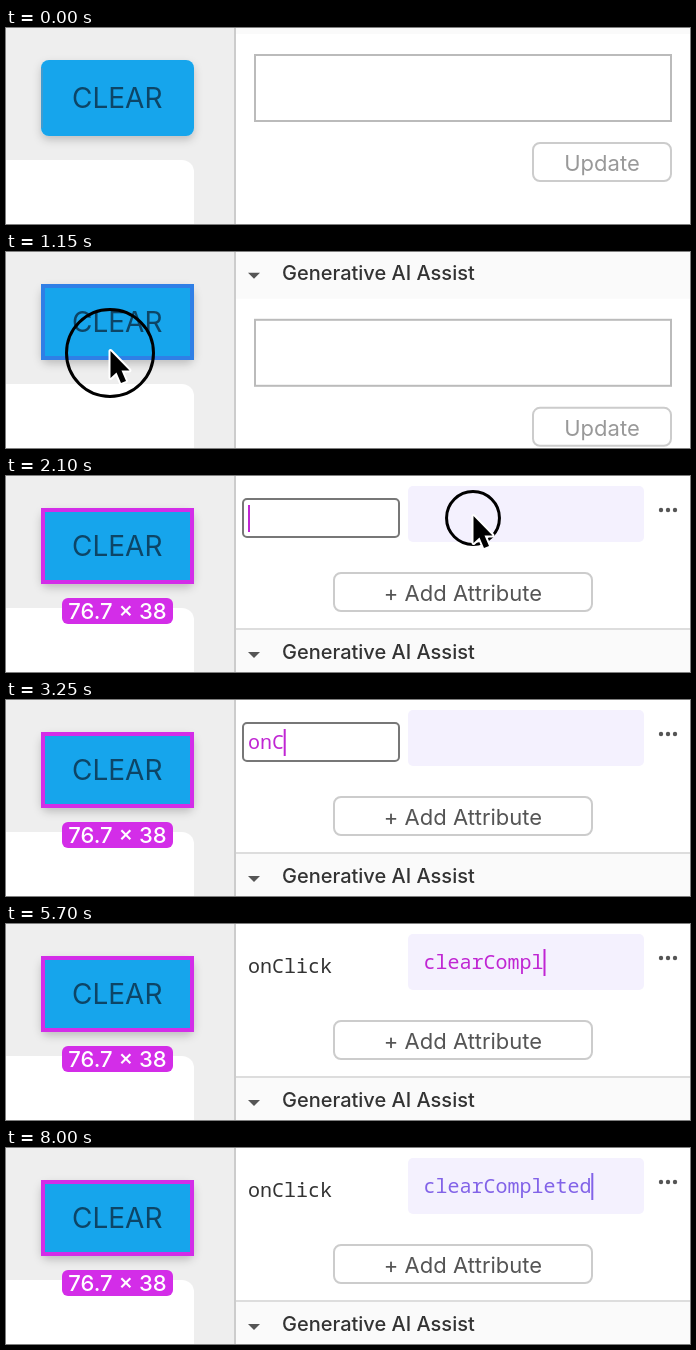
Write an HTML page that moves like this. It is 684 by 196 pixels and loops after 8250 ms.

```html
<!DOCTYPE html>
<html lang="en">
<head>
<meta charset="utf-8">
<title>Attribute editor</title>
<style>
  html, body { margin: 0; width: 100%; height: 100%; overflow: hidden; background: #fff; }
  svg { display: block; width: 684px; height: 196px; }
  text { font: 22px Inter, sans-serif; white-space: pre; }
  .mono { font: 20px "Noto Sans Mono", monospace; }
  .line { fill: #fff; stroke-width: 2; }
</style>
</head>
<body>
<svg viewBox="0 0 684 196">
  <defs>
    <filter id="soft" x="-20%" y="-30%" width="140%" height="180%">
      <feDropShadow dx="0" dy="4" stdDeviation="4" flood-opacity=".2"/>
    </filter>
  </defs>

  <rect width="228" height="196" fill="#eee"/>
  <rect x="-20" y="132" width="208" height="90" rx="12" fill="#fff"/>
  <rect x="35" y="32" width="153" height="76" rx="8" fill="#18a5ec" filter="url(#soft)"/>
  <path d="M36 40V100" stroke="#3d9cd2" stroke-width="2"/>
  <text x="66" y="80" style="font-size:28px" fill="#0d4566">CLEAR</text>
  <rect id="outline" x="37" y="34" width="149" height="72" fill="none" stroke-width="4"/>
  <g id="size">
    <rect x="56" y="122" width="111" height="26" rx="6" fill="#d32de8"/>
    <text x="111.5" y="143" text-anchor="middle" style="font-weight:500" fill="#fff">76.7 × 38</text>
  </g>

  <g id="panel">
    <g id="add">
      <rect class="line" x="328" y="-99" width="258" height="38" rx="7" stroke="#ccc"/>
      <text x="457" y="-71" text-anchor="middle" fill="#555">+ Add Attribute</text>
    </g>
    <rect x="230" y="-43" width="454" height="49" fill="#fafafa"/>
    <rect x="230" y="-44" width="454" height="2" fill="#ddd"/>
    <path d="M242-20h12l-6 6z" fill="#555"/>
    <text x="276" y="-13" style="font-size:20px;font-weight:500" fill="#333">Generative AI Assist</text>
    <rect class="line" x="249" y="27" width="416" height="66" stroke="#bbb"/>
    <rect class="line" x="527" y="115" width="138" height="38" rx="7" stroke="#ccc"/>
    <text x="596" y="143" text-anchor="middle" fill="#999">Update</text>
  </g>

  <g id="row">
    <rect id="field" class="line" x="237" y="23" width="156" height="38" rx="4" stroke="#777"/>
    <text id="name" class="mono" x="242" y="49"></text>
    <rect x="402" y="10" width="236" height="56" rx="5" fill="#f4f1fe"/>
    <text id="value" class="mono" x="417.5" y="45"></text>
    <g fill="#555"><circle cx="655" cy="34" r="2.2"/><circle cx="662" cy="34" r="2.2"/><circle cx="669" cy="34" r="2.2"/></g>
    <rect id="caret" width="2" height="27"/>
  </g>

  <rect x="228" width="2" height="196" fill="#ccc"/>
  <g id="mouse">
    <circle id="ring" cx="1" cy="4" fill="none" stroke="#000" stroke-width="3"/>
    <path d="M1.500 2V29L7.500 23.500L12 34L17 32L12.500 21.500H20.500Z"
      stroke="#fff" stroke-width="4" paint-order="stroke" stroke-linejoin="round"/>
  </g>
</svg>
<script>
const $ = id => document.getElementById(id);
const set = (id, attrs) => { for (const k in attrs) $(id).setAttribute(k, attrs[k]); };
const show = (id, on) => set(id, { visibility: on ? 'visible' : 'hidden' });
const clamp = x => Math.max(0, Math.min(1, x));
const span = (t, a, b) => clamp((t - a) / (b - a));
const ease = p => p < .5 ? 2 * p * p : 1 - 2 * (1 - p) ** 2;
const mix = (a, b, p) => a + (b - a) * p;

// Times at which each character appears
const nameKeys = [2900, 3000, 3250, 3350, 3400, 3450, 3500];
const valueKeys = [4350, 4400, 4500, 4550, 4650, 5350, 5550, 5600, 5650, 5700, 5800, 5850, 5900, 6000];
// Times at which the caret becomes visible again and starts a new blink
const caretStarts = [2100, 3750, 4300, 7000];
const typed = (text, keys, t) => text.slice(0, keys.filter(k => k <= t).length);
const pink = '#c026d3', violet = '#8263e8';

function draw(t) {
  const selected = t >= 1200, added = t >= 2100, naming = t < 3750;

  // Pointer
  const enter = ease(span(t, 500, 1050)), move = ease(span(t, 1550, 2050));
  const x = mix(mix(-24, 103, enter), 466, move);
  const y = mix(mix(190, 97, enter), 38, move);
  show('mouse', t >= 550 && t < 2900);
  set('mouse', { transform: `translate(${x} ${y})` });
  const press = t < 1600
    ? 43.5 * span(t, 1000, 1130) * (1 - span(t, 1200, 1350))
    : 27 * span(t, 2000, 2080) * (1 - span(t, 2100, 2150));
  set('ring', { r: press, opacity: press > 1 ? 1 : 0 });

  // Canvas selection
  show('outline', selected || (t >= 550 && y < 108 && x > 35));
  set('outline', { stroke: selected ? '#d32de8' : '#2f7fe6' });
  show('size', selected);

  // Side panel
  const shift = added ? 196 : 120 * span(t, 1100, 1250);
  set('panel', { transform: `translate(0 ${shift})` });

  // Attribute row
  $('row').style.display = added ? '' : 'none';
  show('field', naming);
  const name = typed('onClick', nameKeys, t), value = typed('clearCompleted', valueKeys, t);
  const ink = t < 7000 ? pink : violet;
  $('name').textContent = name;
  set('name', { fill: naming ? pink : '#333' });
  $('value').textContent = value;
  set('value', { fill: ink });

  const last = Math.max(...[...caretStarts, ...nameKeys, ...valueKeys].filter(k => k <= t));
  const blinkOn = Math.floor((t - last) / 250) % 2 === 0;
  show('caret', added && (blinkOn || (t >= 3500 && naming)) && !(t >= 4000 && t < 4300));
  set('caret', naming
    ? { x: 242 + name.length * 11.9, y: 29, fill: pink }
    : { x: 418 + value.length * 11.95, y: 25, fill: ink });
}

const start = performance.now();
function frame(now) {
  draw(Math.max(0, now - start) % 8250);
  requestAnimationFrame(frame);
}
draw(0);
requestAnimationFrame(frame);
</script>
</body>
</html>
```
